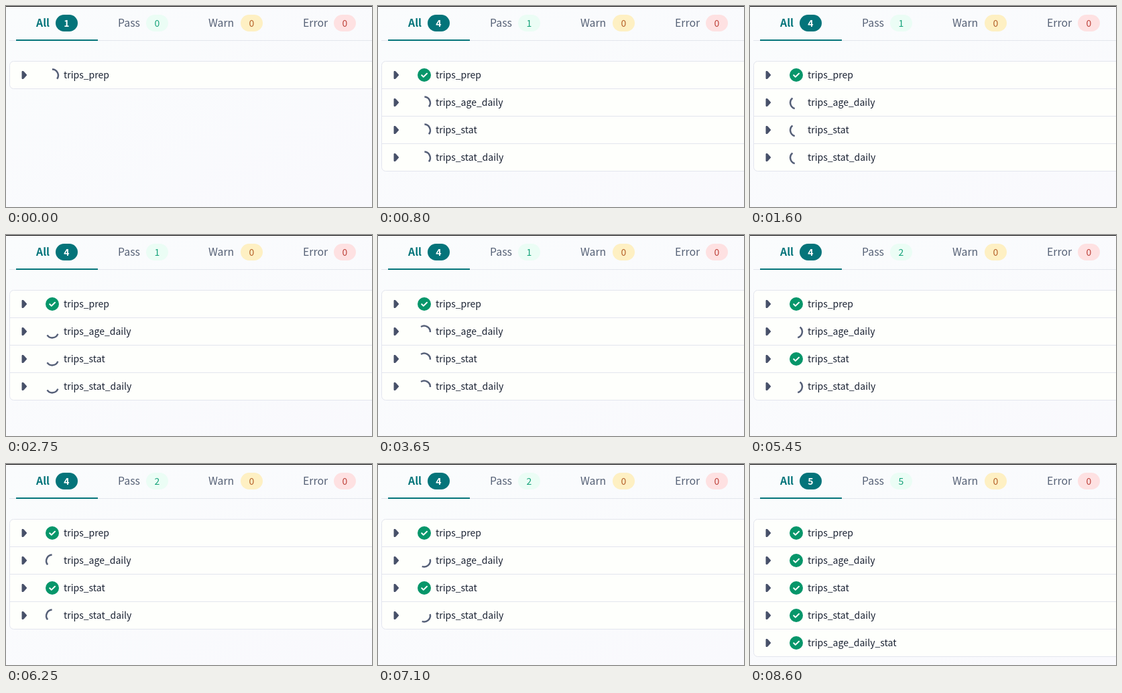
An HTML page that plays this animation: 546x300 px, repeating every 10000 ms.

```html
<!DOCTYPE html>
<html lang="en">
<head>
<meta charset="utf-8">
<title>Run results</title>
<style>
  html, body { margin: 0; width: 100%; height: 100%; overflow: hidden; background: #fafafd; }
  svg { display: block; width: 100vw; height: 100vh; }
  text { font-family: "Noto Sans CJK SC", "Noto Sans CJK JP", "Noto Sans CJK", "Noto Sans", sans-serif; }
  .tab { font-size: 15.8px; fill: #566176; }
  .count { font-size: 14px; text-anchor: middle; }
  .name { font-size: 14px; font-weight: 500; fill: #1a2233; }
</style>
</head>
<body>
<svg id="stage" viewBox="0 0 546 300">
  <defs>
    <linearGradient id="bg" x2="1" y2="1">
      <stop offset="0" stop-color="#fafcfd"/>
      <stop offset="1" stop-color="#f9f9fd"/>
    </linearGradient>
  </defs>
  <rect width="546" height="300" fill="url(#bg)"/>
  <rect width="546" height="1" fill="#000"/>
  <rect x="5" y="51" width="541" height="1" fill="#e3e6ed"/>
  <rect x="15" y="50" width="122" height="2" fill="#04747a"/>
  <g id="tabs"></g>
  <rect id="panel" x="5.5" y="82.5" width="560" rx="6" fill="#fefffc" stroke="#e3e5ee"/>
  <g id="rows"></g>
</svg>
<script>
const LOOP = 10000, STEP = 50, TURN = 1500, ROW = 41;
const FAN_OUT = 550, STAT_DONE = 5300, LAST_ROW = 7900, ALL_DONE = 8600;

const tabs = [
  { label: 'All', x: 45, pill: 74, bg: '#04747a', ink: '#fff', bold: true },
  { label: 'Pass', x: 167, pill: 209, bg: '#ebfdf5', ink: '#16a37a' },
  { label: 'Warn', x: 302, pill: 350, bg: '#fef0c3', ink: '#b45f28' },
  { label: 'Error', x: 443, pill: 489, bg: '#fee1e2', ink: '#bd4038' }
];

// angle: middle of the spinner arc when the row appears
const models = [
  { name: 'trips_prep', start: 0, end: FAN_OUT, angle: -27 },
  { name: 'trips_age_daily', start: FAN_OUT, end: LAST_ROW, angle: -84 },
  { name: 'trips_stat', start: FAN_OUT, end: STAT_DONE, angle: -84 },
  { name: 'trips_stat_daily', start: FAN_OUT, end: LAST_ROW, angle: -84 },
  { name: 'trips_age_daily_stat', start: LAST_ROW, end: ALL_DONE, angle: -90 }
];

function add(parent, tag, attrs, text) {
  const el = document.createElementNS('http://www.w3.org/2000/svg', tag);
  for (const key in attrs) el.setAttribute(key, attrs[key]);
  if (text !== undefined) el.textContent = text;
  return parent.appendChild(el);
}

const byId = id => document.getElementById(id);
const show = (el, on) => el.setAttribute('visibility', on ? 'visible' : 'hidden');

for (const tab of tabs) {
  const weight = tab.bold ? 700 : 400;
  add(byId('tabs'), 'text', { class: 'tab', x: tab.x, y: 31, 'font-weight': weight,
    style: tab.bold ? 'fill:#04747a' : '' }, tab.label);
  add(byId('tabs'), 'rect', { x: tab.pill, y: 13, width: 33, height: 25, rx: 12.5, fill: tab.bg });
  tab.count = add(byId('tabs'), 'text', { class: 'count', x: tab.pill + 16.5, y: 30.5,
    'font-weight': weight, fill: tab.ink }, 0);
}

models.forEach((m, i) => {
  m.row = add(byId('rows'), 'g', { transform: `translate(0 ${103 + i * ROW})` });
  if (i) add(m.row, 'rect', { x: 6, y: -21, width: 540, height: 1, fill: '#e3e5ee' });
  add(m.row, 'path', { d: 'M24 -5.5 H26 L30.5 -.5 V.5 L26 5.5 H24 Z', fill: '#475069',
    stroke: '#475069', 'stroke-width': 1, 'stroke-linejoin': 'round' });
  add(m.row, 'text', { class: 'name', x: 86, y: 5 }, m.name);
  m.spinner = add(m.row, 'path', { d: 'M4 -8 A9 9 0 0 1 4 8', fill: 'none',
    stroke: '#566078', 'stroke-width': 2.5 });
  m.check = add(m.row, 'g', { transform: 'translate(69 0)' });
  add(m.check, 'circle', { r: 10, fill: '#07966a' });
  add(m.check, 'path', { d: 'M-3.8 .3 L-1.2 2.9 L4 -2.3', fill: 'none', stroke: '#fff',
    'stroke-width': 2, 'stroke-linecap': 'round', 'stroke-linejoin': 'round' });
});

function render(ms) {
  const t = Math.floor((ms % LOOP) / STEP) * STEP;
  const listed = models.filter(m => t >= m.start).length;
  const passed = models.filter(m => t >= m.end).length;
  tabs[0].count.textContent = listed;
  tabs[1].count.textContent = passed;
  byId('panel').setAttribute('height', listed * ROW);
  for (const m of models) {
    const visible = t >= m.start, done = t >= m.end;
    const angle = m.angle + (t - m.start) / TURN * 360;
    show(m.row, visible);
    show(m.spinner, visible && !done);
    show(m.check, visible && done);
    m.spinner.setAttribute('transform', `translate(69 .5) rotate(${angle})`);
  }
}

const origin = performance.now();
function tick() {
  render(performance.now() - origin);
  requestAnimationFrame(tick);
}
render(0);
tick();
</script>
</body>
</html>
```
